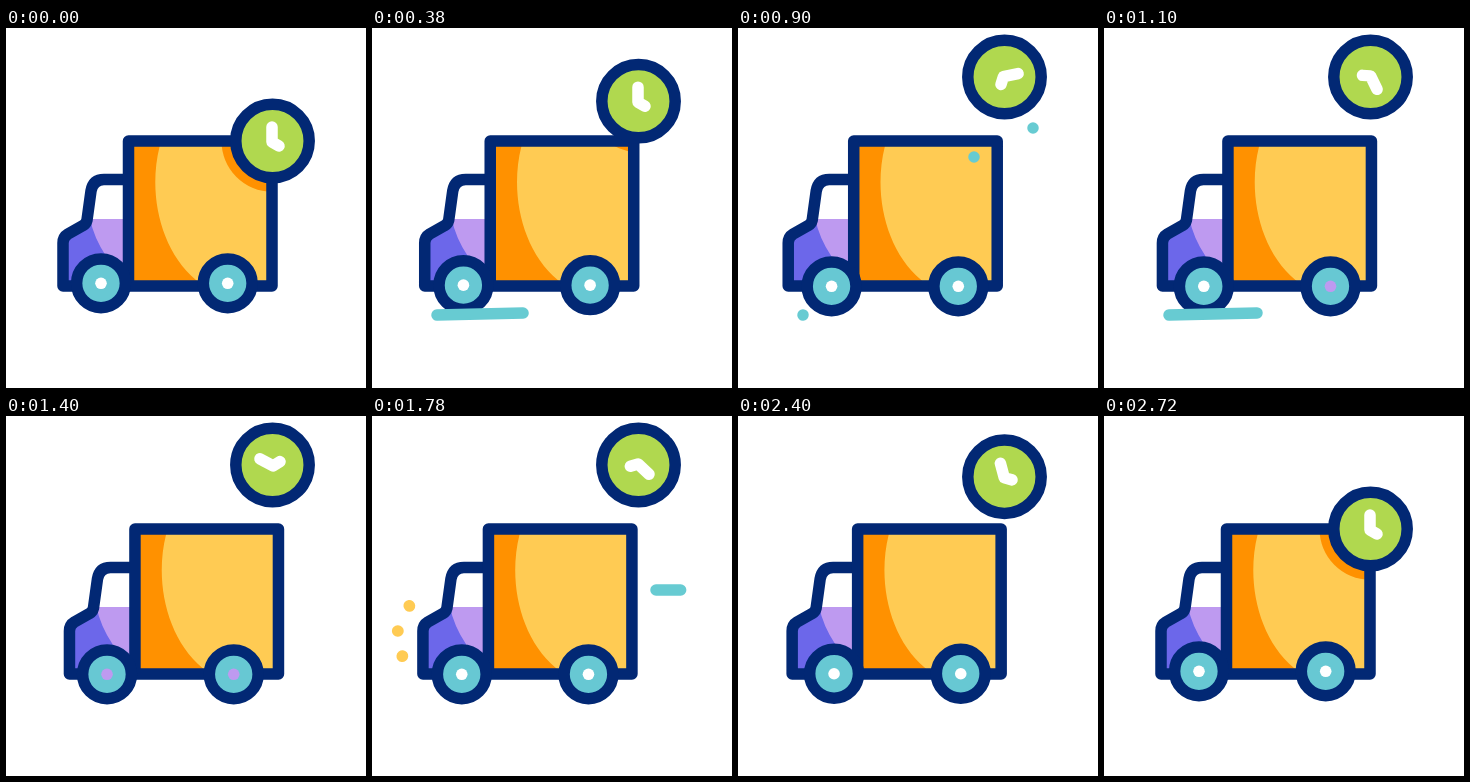
Recreate the animation shown at these times as an HTML page. Size 360x360 px, loop 2.76 s.

```html
<!DOCTYPE html>
<html lang="en">
<head>
<meta charset="utf-8">
<title>Delivery truck</title>
<style>
  html, body { margin: 0; height: 100%; overflow: hidden; background: #fff; }
  svg { display: block; width: 100vw; height: 100vh; }
  .ink { stroke: #022874; stroke-width: 11.5; stroke-linejoin: round; stroke-linecap: round; }
  #streaks { stroke-width: 11.5; stroke-linecap: round; }
</style>
</head>
<body>
<svg viewBox="0 0 360 360" fill="none">
  <defs>
    <clipPath id="boxClip"><path d="M122.5 113H266V258H122.5Z"/></clipPath>
    <clipPath id="cabClip"><path d="M57 258V214Q57 209 62 206L81 195V191H122V258Z"/></clipPath>
    <g id="wheel"><circle class="ink" r="24.4" fill="#67c8d3"/><circle r="5.8"/></g>
  </defs>
  <g id="body">
    <g clip-path="url(#cabClip)">
      <path fill="#be9af0" d="M50 191H122V260H50Z"/>
      <path fill="#6c67ea" d="M50 191H84Q88 210 100 228V260H50Z"/>
    </g>
    <path class="ink" d="M122 258H57V215Q57 209 62 206L77 197.5Q80 196 81 192L85 163Q87 151.5 98 151.5H122"/>
    <g clip-path="url(#boxClip)">
      <path fill="#ffcb53" d="M122 113H267V259H122Z"/>
      <path fill="#ff9100" d="M122 113H155L153.5 119C142 165 154 222 190 252L199 259H122Z"/>
      <circle id="shade" r="51" fill="#ff9100"/>
    </g>
    <path class="ink" d="M122.5 113H266V258H122.5Z"/>
  </g>
  <use id="leftWheel" href="#wheel"/>
  <use id="rightWheel" href="#wheel"/>
  <g id="clock">
    <circle class="ink" r="36.7" fill="#b0d84f"/>
    <path id="hands" d="M-.5-14V1L6.5 5" stroke="#fff" stroke-width="11.5" stroke-linecap="round" stroke-linejoin="round"/>
    <path id="glint" fill="#fff" d="M-1-27H12L10-23 19-21V-14H7L1-4-5-6 3-19Z"/>
    <path id="flash" fill="#fff" d="M-14-28A31 31 0 1 1 0 31L-9 28-7 21H11V5L-4 5Q-18 2-17-4-15-11-5-10L-1-12-7-16Z"/>
  </g>
  <g id="streaks"></g>
</svg>
<script>
const LOOP = 2760, SWAY = 1420;
const TEAL = '#67cbd2', YELLOW = '#ffcb53', LILAC = '#be9af0';
const $ = id => document.getElementById(id);
const set = (el, attrs) => { for (const k in attrs) el.setAttribute(k, attrs[k]); };
const span = (t, from, to) => (1 - Math.cos(Math.PI * Math.min(1, Math.max(0, (t - from) / (to - from))))) / 2;
const within = (t, from, to) => t >= from && t < to;
const show = on => ({ visibility: on ? 'visible' : 'hidden' });
const place = (id, x, y) => set($(id), { transform: `translate(${x} ${y})` });
const sway = (t, centre, size) => centre - size * Math.cos(2 * Math.PI * t / SWAY);

// A line grows from its start, then its tail catches up with the head
const streaks = [];
function addStreak(start, x, y, dx, dy, stroke = TEAL) {
  const el = document.createElementNS('http://www.w3.org/2000/svg', 'line');
  set(el, { stroke });
  $('streaks').append(el);
  streaks.push(t => {
    const head = span(t, start, start + 200), tail = span(t, start + 200, start + 400);
    set(el, {
      x1: x + dx * tail, y1: y + dy * tail,
      x2: x + dx * head, y2: y + dy * head,
      ...show(within(t, start, start + 460))
    });
  });
}
for (const start of [200, 900]) addStreak(start, 65, 287, 88, -2);
addStreak(500, 165, 130, 71, -1);
addStreak(500, 270, 100, 25, 0);
addStreak(1695, 284, 174, 63, 0);
addStreak(1940, 279, 204, 44, -1.5);
for (const i of [-1, 0, 1])
  addStreak(1760, 26 + 8 * Math.abs(i) - 3.5 * i, 215 + 25 * i, -14 + 2.5 * Math.abs(i), 9.5 * i, YELLOW);

function draw(t) {
  const lift = span(t, 80, 600) - span(t, 2280, 2710);
  const clockY = 113 - 64 * lift;
  const bodyX = lift * sway(t - 640, -2.9, 9.6);
  const wheelX = lift * sway(t - 570, -0.6, 7.7);
  place('body', bodyX, 0);
  place('clock', 266.5, clockY);
  set($('shade'), { cx: 266.5 - bodyX, cy: clockY });
  set($('hands'), { transform: `rotate(${720 * span(t, 440, 2600)})` });
  place('leftWheel', 95 + wheelX, 255.3 + 3 * lift);
  place('rightWheel', 221.7 + wheelX, 255.3 + 3 * lift);
  set($('leftWheel'), { fill: within(t, 1120, 1640) ? LILAC : '#fff' });
  set($('rightWheel'), { fill: within(t, 1080, 1640) ? LILAC : '#fff' });
  set($('glint'), show(within(t, 640, 760)));
  set($('flash'), show(within(t, 2060, 2240)));
  streaks.forEach(update => update(t));
}

const start = performance.now();
function tick() {
  draw((performance.now() - start) % LOOP);
  requestAnimationFrame(tick);
}
tick();
</script>
</body>
</html>
```
